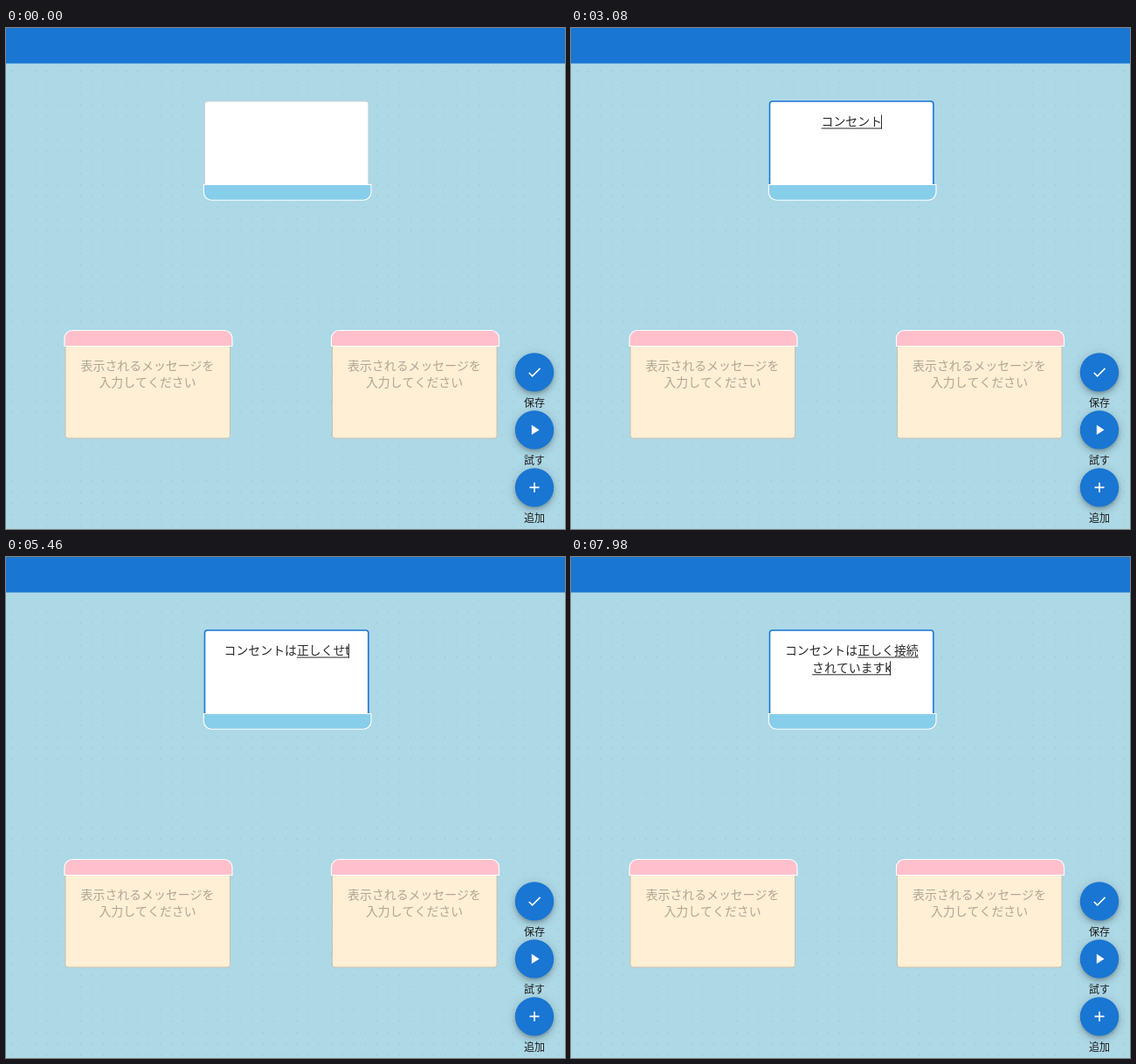
Write an HTML page with a canvas that moves like this. It is 640 by 574 pixels and loops after 8 s.

```html
<!DOCTYPE html>
<html lang="ja">
<head>
<meta charset="utf-8">
<title>メッセージ入力</title>
<style>
html, body { margin: 0; width: 100%; height: 100%; overflow: hidden; background: #add8e6; }
canvas { display: block; }
</style>
</head>
<body>
<canvas id="stage" width="640" height="574"></canvas>
<script>
const ctx = document.getElementById('stage').getContext('2d');
const LOOP = 8000;
const FOCUS_AT = 840;
const BLUE = '#1976d2';
const INK = '#2a2a2a';
const FONT = 'Roboto, "Noto Sans CJK JP", "Noto Sans CJK", sans-serif';
const TEXT_SIZE = 13.9;
const LINE_HEIGHT = 19.8;
const MAX_WIDTH = 164;
const DOT_GAP = 13.03;

// Each step is "committed|composing".
const typing = [
  [FOCUS_AT, '|'],
  [1680, '|k'], [1820, '|こ'], [1960, '|こn'], [2100, '|こん'],
  [2240, '|こんs'], [2380, '|こんせ'], [2520, '|こんせn'], [2590, '|こんせん'],
  [2730, '|こんせんt'], [2870, '|コンセント'],
  [3220, '|コンセントh'], [3360, '|コンセントは'], [3570, 'コンセントは|'],
  [3780, 'コンセントは|t'], [3920, 'コンセントは|た'],
  [4130, 'コンセントは|ただ'], [4410, 'コンセントは|ただs'],
  [4690, 'コンセントは|ただし'], [4900, 'コンセントは|ただしk'],
  [5040, 'コンセントは|正しく'], [5320, 'コンセントは|正しくs'],
  [5390, 'コンセントは|正しくせ'], [5460, 'コンセントは|正しくせt'],
  [5600, 'コンセントは|正しくせつ'], [5740, 'コンセントは|正しくせつz'],
  [5810, 'コンセントは|正しくせつぞ'], [5950, 'コンセントは|正しくせつぞk'],
  [6090, 'コンセントは|正しく接続'], [6440, 'コンセントは|正しく接続s'],
  [6580, 'コンセントは|正しく接続さ'], [6720, 'コンセントは|正しく接続さr'],
  [6930, 'コンセントは|正しく接続され'], [7070, 'コンセントは|正しく接続されt'],
  [7140, 'コンセントは|正しく接続されて'], [7280, 'コンセントは|正しく接続されてい'],
  [7420, 'コンセントは|正しく接続されていm'], [7490, 'コンセントは|正しく接続されていま'],
  [7630, 'コンセントは|正しく接続されていまs'],
  [7700, 'コンセントは|正しく接続されています'],
  [7910, 'コンセントは|正しく接続されていますk']
];

const icons = {
  check: new Path2D('M9 16.17L4.83 12l-1.42 1.41L9 19 21 7l-1.41-1.41z'),
  play: new Path2D('M8 5v14l11-7z'),
  plus: new Path2D('M19 13h-6v6h-2v-6H5v-2h6V5h2v6h6v2z')
};

function box(x, y, w, h, radius, fill, stroke, lineWidth) {
  ctx.beginPath();
  ctx.roundRect(x, y, w, h, radius);
  ctx.fillStyle = fill;
  ctx.fill();
  ctx.strokeStyle = stroke;
  ctx.lineWidth = lineWidth;
  ctx.stroke();
}

function disc(x, y, radius, color) {
  ctx.beginPath();
  ctx.arc(x, y, radius, 0, Math.PI * 2);
  ctx.fillStyle = color;
  ctx.fill();
}

function label(text, x, y, size, color, align = 'center') {
  ctx.font = `${size}px ${FONT}`;
  ctx.textAlign = align;
  ctx.fillStyle = color;
  ctx.fillText(text, x, y);
}

function drawBackground() {
  ctx.fillStyle = '#add8e6';
  ctx.fillRect(0, 0, 640, 574);
  for (let y = 49.5; y < 574; y += DOT_GAP)
    for (let x = 7.5; x < 640; x += DOT_GAP) disc(x, y, 0.55, 'rgba(110, 140, 155, 0.35)');
  ctx.fillStyle = BLUE;
  ctx.fillRect(0, 0, 640, 40.6);
}

function drawMessageCard(x) {
  box(x + 1, 358, 188.5, 112, 3, '#ffefd5', '#c8bda9', 0.9);
  box(x, 346.5, 192, 18, [9, 9, 0, 0], '#ffc0cb', '#fff', 1.1);
  const center = x + 95;
  label('表示されるメッセージを', center, 391.5, TEXT_SIZE, '#b1a694');
  label('入力してください', center, 391.5 + LINE_HEIGHT, TEXT_SIZE, '#b1a694');
}

function drawButton(y, icon, text) {
  for (const [dy, blur, alpha] of [[2.4, 4, 0.2], [4.7, 8, 0.14], [0.8, 14, 0.12]]) {
    ctx.save();
    ctx.shadowColor = `rgba(0, 0, 0, ${alpha})`;
    ctx.shadowOffsetY = dy;
    ctx.shadowBlur = blur;
    disc(605, y, 21.5, BLUE);
    ctx.restore();
  }
  disc(605, y, 22.2, BLUE);
  ctx.save();
  ctx.translate(605, y);
  ctx.scale(0.79, 0.79);
  ctx.translate(-12, -12);
  ctx.fillStyle = '#fff';
  ctx.fill(icons[icon]);
  ctx.restore();
  label(text, 605, y + 39.5, 12, '#1a1a1a');
}

function wrap(text) {
  const lines = [''];
  for (const char of text) {
    const last = lines.length - 1;
    if (ctx.measureText(lines[last] + char).width > MAX_WIDTH) lines.push(char);
    else lines[last] += char;
  }
  return lines;
}

function drawInput(state) {
  const [committed, composing] = state.split('|');
  ctx.font = `${TEXT_SIZE}px ${FONT}`;
  const lines = wrap(committed + composing);
  let start = 0;
  let end = 0;
  lines.forEach((line, i) => {
    const width = ctx.measureText(line).width;
    const left = 321.3 - width / 2;
    const plain = line.slice(0, Math.max(0, committed.length - start));
    const underlineX = left + ctx.measureText(plain).width;
    end = left + width;
    label(line, left, 112.3 + i * LINE_HEIGHT, TEXT_SIZE, INK, 'left');
    if (plain.length < line.length)
      ctx.fillRect(underlineX, 114.5 + i * LINE_HEIGHT, end - underlineX, 1);
    start += line.length;
  });
  ctx.fillStyle = INK;
  ctx.fillRect(Math.round(end) - 1, 99.5 + (lines.length - 1) * LINE_HEIGHT, 1, 16);
}

function drawQuestionCard(time) {
  const focused = time >= FOCUS_AT;
  box(227.5, 84, 187.4, 106, 3, '#fff', focused ? BLUE : '#c9cfd2', focused ? 1.6 : 0.9);
  box(226.4, 179.5, 191.6, 17.8, [0, 0, 9, 9], '#87ceeb', '#fff', 1.1);
  if (focused) drawInput(typing.findLast(([at]) => time >= at)[1]);
}

function draw(now) {
  const time = now % LOOP;
  drawBackground();
  drawQuestionCard(time);
  drawMessageCard(67);
  drawMessageCard(372.5);
  drawButton(394.4, 'check', '保存');
  drawButton(460.4, 'play', '試す');
  drawButton(526.4, 'plus', '追加');
  requestAnimationFrame(draw);
}

requestAnimationFrame(draw);
</script>
</body>
</html>
```
